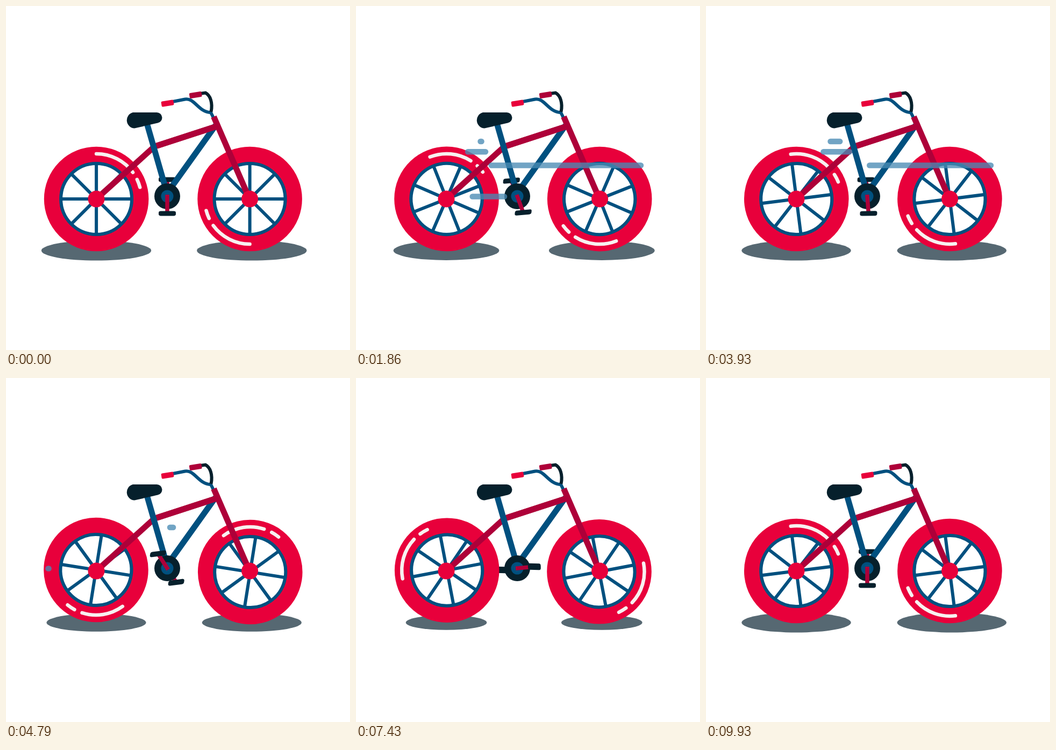
An HTML page for the animation above (10 s loop, 640 px wide and 640 px high).

```html
<!DOCTYPE html>
<html lang="en">
<head>
<meta charset="utf-8">
<title>Bicycle</title>
<style>
  html, body { margin: 0; width: 100%; height: 100%; overflow: hidden; background: #fff; }
  svg { display: block; width: 100vw; height: 100vh; }
  .red { fill: #e8003b; }
  .maroon { fill: #ae0039; }
  .blue { fill: #00507f; }
  .dark { fill: #06202c; }
  .line { fill: none; }
  .line.red { stroke: #e8003b; }
  .line.maroon { stroke: #ae0039; }
  .line.blue { stroke: #00507f; }
  .line.dark { stroke: #06202c; }
  .tube { stroke-width: 11; }
  .bar { stroke-width: 6; }
  .crank { stroke-width: 7.5; }
  .shine { fill: none; stroke: #f7f1f0; stroke-width: 6.5; stroke-linecap: round; }
  .shadow { fill: #566872; }
  #wind { stroke: #4a8bb4; stroke-width: 10.5; stroke-linecap: round; }
  #wind line { opacity: .78; }
</style>
</head>
<body>
<svg viewBox="0 0 640 640">
  <defs>
    <g id="wheel" transform="translate(0 1.1)">
      <circle class="line red" r="82" stroke-width="30.6"/>
      <circle class="line blue bar" r="66"/>
      <path class="line blue bar" d="M-66 0H66M0-66V66M-46.7-46.7L46.7 46.7M-46.7 46.7L46.7-46.7"/>
      <path class="shine" d="M0-84A84 84 0 0 1 68-49.4M75.8-36.2A84 84 0 0 1 81.1-21.7"/>
    </g>
    <rect id="pedal" class="dark" x="-16" y="-4.5" width="32" height="9" rx="4.2"/>
  </defs>

  <ellipse class="shadow" cx="168" cy="455"/>
  <ellipse class="shadow" cx="457.3" cy="455"/>

  <g class="arm">
    <path class="line maroon crank" d="M0 0V-30"/>
    <use href="#pedal" class="foot" data-y="-31"/>
  </g>

  <use href="#wheel" class="spin" data-x="168.1" data-y="357.9" data-turn="0"/>
  <use href="#wheel" class="spin" data-x="453.6" data-y="360.1" data-turn="180"/>

  <path class="line maroon tube" d="M390 224.5L276 261.500L168 359"/>
  <path class="line blue tube" d="M262 218L296 336M390 222L307 338"/>
  <path class="line maroon tube" d="M390 224.5L281 260"/>
  <path class="line blue bar" d="M380 196L387 210M310 178L333 173.500C350 170 358 197 380 198"/>
  <path class="line dark bar" d="M361 163L371 161.500C380 166 385 180 381.500 197"/>
  <path class="line maroon tube" d="M386.500 206L453 359"/>
  <rect class="red" x="-11.500" y="-5" width="23" height="10" rx="2" transform="translate(300.500 181) rotate(-9)"/>
  <rect class="maroon" x="-11.500" y="-5" width="23" height="10" rx="2" transform="translate(352.700 165.500) rotate(-9)"/>
  <path class="dark" d="M236 198H280.500A9.900 9.900 0 0 1 282.500 217.600L239 227.500A15 15 0 0 1 236 198Z"/>

  <circle class="red" cx="168" cy="359" r="15.500"/>
  <circle class="red" cx="453.600" cy="359" r="15.500"/>

  <circle class="dark" cx="300" cy="354" r="24"/>
  <circle class="blue" cx="300" cy="354" r="11.500"/>
  <g class="arm">
    <path class="line maroon crank" d="M0-3V32"/>
    <use href="#pedal" class="foot" data-y="32"/>
  </g>

  <g id="wind"></g>
</svg>
<script>
const LOOP = 10000;
const all = s => [...document.querySelectorAll(s)];
const shadows = all('.shadow'), wheels = all('.spin'), arms = all('.arm'), feet = all('.foot');

// Each streak: height, right end, left end, then start and length of its head and tail moves
const STREAKS = [
  [354.5, 276, 78.5, 600, 440, 1000, 460],
  [296.5, 530, 241, 0, 860, 880, 520],
  [271.3, 267, 206.5, 0, 840, 615, 320],
  [252, 270, 231.5, 0, 560, 347, 480],
  [278, 440, 305, 900, 400, 1100, 390]
];
const GUSTS = [0, 1, 2, 3, 5, 7].map(n => n * 1120);

const ease = u => {
  u = Math.min(1, Math.max(0, u));
  return u * u * (3 - 2 * u);
};

const wind = document.getElementById('wind');
const streaks = GUSTS.flatMap(start => STREAKS.map(([y, from, to, head, headLen, tail, tailLen]) => {
  const el = document.createElementNS('http://www.w3.org/2000/svg', 'line');
  el.setAttribute('y1', y);
  el.setAttribute('y2', y);
  wind.append(el);
  return t => {
    const h = ease((t - start - head) / headLen);
    const e = ease((t - start - tail) / tailLen);
    el.setAttribute('visibility', h > 0 && e < 1 ? 'visible' : 'hidden');
    el.setAttribute('x1', from + (to - from) * e);
    el.setAttribute('x2', from + (to - from) * h - .01);
  };
}));

// 14 pictures a second, each showing the next 1/25 s pose
function poseTime(now) {
  const tick = Math.floor((now % LOOP) / 10);
  const k = Math.floor((tick + .5) * .14);
  return Math.ceil(k * 25 / 14) * 40;
}

function draw(t) {
  const size = 1 - .136 * (1 - Math.cos(t * Math.PI / 500));
  for (const s of shadows) {
    s.setAttribute('rx', 102.2 * size);
    s.setAttribute('ry', 18.6 * size);
  }

  for (const w of wheels) {
    const { x, y, turn } = w.dataset;
    w.setAttribute('transform', `translate(${x} ${y}) rotate(${t * .18 + +turn})`);
  }

  const angle = t * 1800 / 9960;
  for (const a of arms) a.setAttribute('transform', `translate(300 354) rotate(${angle})`);
  // The arm squashes its pedal lengthwise while the pedal stays level
  for (const f of feet) {
    f.setAttribute('transform', `translate(0 ${f.dataset.y}) scale(1 .74) rotate(${-angle}) `);
  }
  for (const move of streaks) move(t);
}

// Restore full pedal thickness lost to the squash
document.getElementById('pedal').setAttribute('height', 12);
document.getElementById('pedal').setAttribute('y', -6);

const begin = performance.now();
function loop() {
  draw(poseTime(performance.now() - begin));
  requestAnimationFrame(loop);
}
loop();
</script>
</body>
</html>
```
